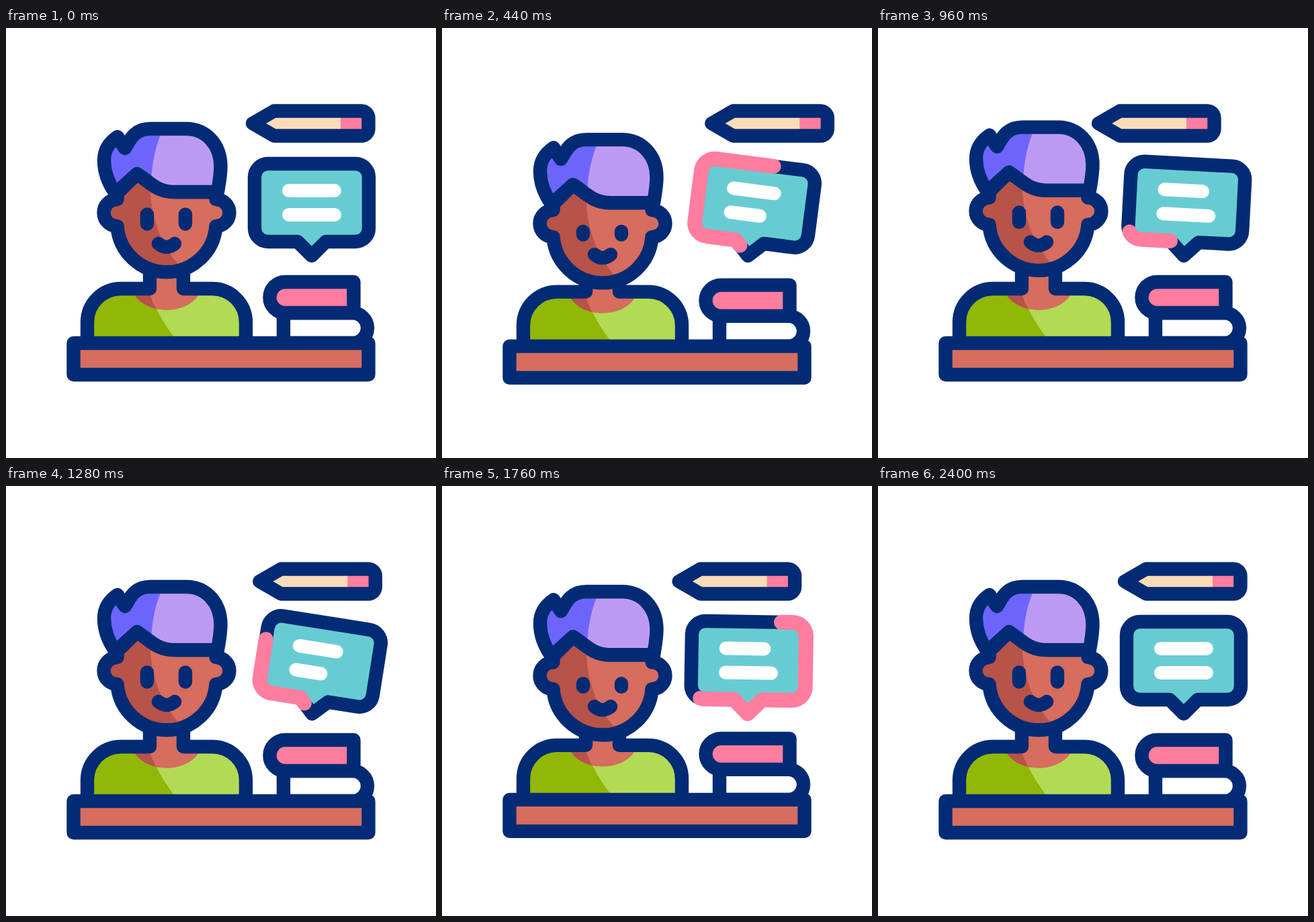
Write an HTML page that moves like this. It is 640 by 640 pixels and loops after 2.64 s.

```html
<!DOCTYPE html>
<html lang="en">
<head>
<meta charset="utf-8">
<title>Teacher at a desk</title>
<style>
  html, body { margin: 0; width: 100%; height: 100%; overflow: hidden; background: #fff; }
  svg { display: block; width: 100%; height: 100%; }
  .line { fill: none; stroke: #032b75; stroke-width: 20.4; stroke-linecap: round; stroke-linejoin: round; }
  .pink { stroke: #ff7d9f; stroke-width: 22; }
  .text { stroke: #fff; stroke-width: 20; }
</style>
</head>
<body>
<svg viewBox="0 0 640 640">
  <defs>
    <path id="face" d="M165.5 255a20 20 0 0 0 0 40A73.7 73.7 0 0 0 312.5 295a20 20 0 0 0 0-40L314 244H250C225 244 215 230 195 217L165.5 246Z"/>
    <path id="hair" d="M163 246C153 232 146 215 146 197C146 181 153 171 166 162L177 179C184 168 190 150 215 150H268C298 150 319.500 174 319.500 206C319.500 220 317 232 315 244H250C225 244 215 230 195 217Z"/>
    <path id="collar" d="M190 395C208 428 270 428 288 395Z"/>
    <path id="shirt" d="M121 469V438A50 50 0 0 1 171 388H307A50 50 0 0 1 357 438V469Z"/>
    <path id="box" d="M434 318H390A20 20 0 0 1 370 298V222A20 20 0 0 1 390 202H520A20 20 0 0 1 540 222V298A20 20 0 0 1 520 318H476L455 339Z"/>
    <path id="wood" d="M367 142L399 123.500H529A10.500 10.500 0 0 1 539.500 134V150A10.500 10.500 0 0 1 529 160.500H399Z"/>
    <clipPath id="inFace"><use href="#face"/></clipPath>
    <clipPath id="inHair"><use href="#hair"/></clipPath>
    <clipPath id="inCollar"><use href="#collar"/></clipPath>
    <clipPath id="inShirt"><use href="#shirt"/></clipPath>
    <clipPath id="inWood"><use href="#wood"/></clipPath>
  </defs>

  <g id="desk">
    <use href="#shirt" fill="#91b707"/>
    <path clip-path="url(#inShirt)" fill="#b3da53" d="M212 388Q224 428 255 466H370V380Z"/>
    <path fill="#d66d5e" d="M214 340H264V400H214Z"/>
    <use href="#collar" fill="#d66d5e"/>
    <path clip-path="url(#inCollar)" fill="#b75349" d="M212 388Q216 406 226 422H180V388Z"/>
    <path class="line" d="M121 469V438A50 50 0 0 1 171 388H214V342M264 342V388H307A50 50 0 0 1 357 438V469"/>
    <path class="line" style="fill:#fff" d="M413 424H515.500A22.500 22.500 0 0 1 515.500 469H413Z"/>
    <path class="line" style="fill:#ff7d9f" d="M517.500 378H415.500A23 23 0 0 0 415.500 424H517.500Z"/>
    <rect class="line" style="fill:#d66d5e" x="100.500" y="469" width="439" height="47"/>
  </g>

  <g id="head">
    <use href="#face" fill="#d66d5e"/>
    <path clip-path="url(#inFace)" fill="#b75349" d="M216 200C213 235 215 262 221 284C229 315 245 342 268 364H130V200Z"/>
    <use href="#face" class="line"/>
    <use href="#hair" fill="#bd9af2"/>
    <path clip-path="url(#inHair)" fill="#6d65fb" d="M236 145C222 175 215 205 216 250H130V145Z"/>
    <use href="#hair" class="line"/>
    <path id="eyes" class="line"/>
    <path class="line" d="M227 321Q239 331 251 321"/>
  </g>

  <g id="pencil">
    <use href="#wood" fill="#fbdcb8"/>
    <path clip-path="url(#inWood)" fill="#ff7d9f" d="M498 115H545V170H498Z"/>
    <use href="#wood" class="line"/>
  </g>

  <g id="bubble">
    <use href="#box" fill="#67ccd2"/>
    <use href="#box" class="line"/>
    <use href="#box" class="line pink" id="trace0"/>
    <use href="#box" class="line pink" id="trace1"/>
    <path id="text" class="line text"/>
  </g>
</svg>
<script>
  const LOOP = 2640, STEP = 40;
  const $ = id => document.getElementById(id);
  const total = $('box').getTotalLength();

  // Eased value along a flat list of time, value pairs
  function track(t, ...k) {
    if (t <= k[0]) return k[1];
    for (let i = 2; i < k.length; i += 2) {
      if (t < k[i]) {
        const u = (t - k[i - 2]) / (k[i] - k[i - 2]);
        return k[i - 1] + (k[i + 1] - k[i - 1]) * (1 - Math.cos(Math.PI * u)) / 2;
      }
    }
    return k[k.length - 1];
  }

  // Time within the current pass of a motion played twice
  const pass = (t, period) => t < period ? t : t - period;

  function trace(el, t) {
    const lead = track(t, 60, -11, 880, 620);
    const tail = track(t, 540, -11, 1070, 620);
    const len = lead - tail;
    el.style.display = len > 0.5 ? '' : 'none';
    el.style.strokeDasharray = `${len} ${total - len}`;
    el.style.strokeDashoffset = -tail;
  }

  function draw(t) {
    const b = pass(t, 1280);
    $('desk').setAttribute('transform', `translate(0 ${track(b, 0, 0, 250, 26, 620, -15, 960, 0)})`);
    $('head').setAttribute('transform', `translate(0 ${track(b, 0, 0, 290, 34, 690, -24, 1030, 0)})`);
    const top = 291.5 - track(b, 240, 14, 460, 4.5, 780, 22, 1000, 14);
    $('eyes').setAttribute('d', `M210 291.5V${top}M267 291.5V${top}`);

    const slide = track(t, 120, 0, 533, 39, 967, -39, 1400, 21, 1833, -17, 2240, 0);
    $('pencil').setAttribute('transform', `translate(${slide} 0)`);

    const tilt = track(t, 0, 0, 400, 7.6, 740, 0, 1300, 9, 1740, 0.8, 1910, 4.2, 2080, 0.4, 2240, 1.8, 2400, 0);
    $('bubble').setAttribute('transform', `rotate(${tilt} 455 342)`);
    trace($('trace0'), t);
    trace($('trace1'), t - 960);

    const w = pass(t, 800 + 240) === t ? t : t - 800;
    const first = t < 1125 ? t : t - 800;
    const a = track(first, 340, 68, 700, 30, 1110, 68);
    const c = track(w, 240, 68, 580, 30, 970, 68);
    $('text').setAttribute('d', `M421 242h${a}M421 278h${c}`);
  }

  const start = performance.now();
  function tick() {
    const t = (performance.now() - start) % LOOP;
    draw(Math.floor(t / STEP) * STEP);
    requestAnimationFrame(tick);
  }
  draw(0);
  requestAnimationFrame(tick);
</script>
</body>
</html>
```
